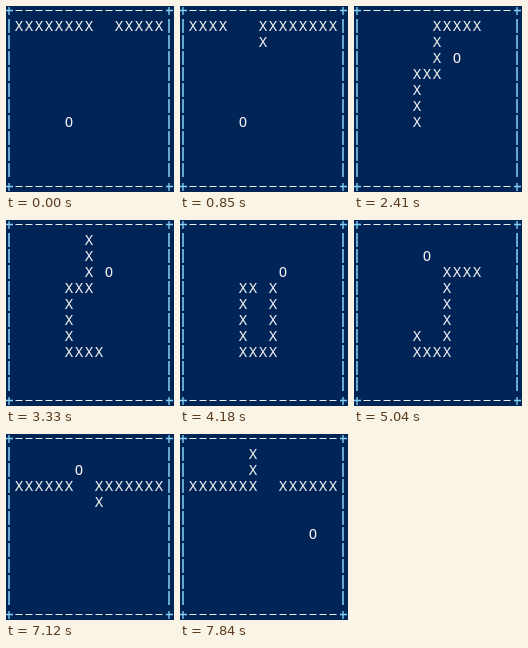
An HTML page that plays this animation: 168 px wide and 186 px high, repeating every 7990 ms.

```html
<!DOCTYPE html>
<html lang="en">
<head>
<meta charset="utf-8">
<title>Console snake</title>
<style>
html, body { margin: 0; width: 100%; height: 100%; overflow: hidden; background: #012456; }
svg { display: block; width: 100%; height: 100%; }
text { font: 14px "DejaVu Sans Mono", monospace; fill: #eeedf0; text-anchor: middle; }
.dash { stroke: #e6ecea; stroke-dasharray: 7 3; }
.pipe { stroke: #86d4f4; stroke-width: 1.5; stroke-dasharray: 14 2; }
.plus { stroke: #86d4f4; stroke-width: 1.3; fill: none; }
</style>
</head>
<body>
<svg viewBox="0 0 168 186">
  <rect width="168" height="186" fill="#012456"/>
  <path class="dash" d="M9.5 4.5H158M9.5 180.5H158"/>
  <path class="pipe" d="M3 13V173M163 13V173"/>
  <path class="plus" d="M0 4.5h7M3 1v8M160 4.5h7M163 1v8M0 180.5h7M3 177v8M160 180.5h7M163 177v8"/>
  <g id="cells"></g>
  <rect id="cursor" height="1" fill="#eeedf0"/>
</svg>
<script>
const LOOP = 7990, COLS = 15, START_LENGTH = 13;
const STEP_TIMES = [
  150, 390, 620, 850, 1080, 1230, 1480, 1720, 1950, 2180,
  2410, 2640, 2790, 3020, 3250, 3480, 3710, 3940, 4180, 4410,
  4650, 4880, 5040, 5280, 5510, 5740, 5970, 6200, 6430, 6660,
  6830, 7040, 7290, 7520, 7760
];
const GROWTH = [24, 35];
const FOODS = [
  { step: 0, col: 6, row: 7 },
  { step: 11, col: 10, row: 3 },
  { step: 21, col: 7, row: 2 },
  { step: 34, col: 13, row: 6 }
];
// Moments when the console cursor shows at a corner
const FLASHES = [
  { at: 1480, col: 0, row: 0 },
  { at: 2790, col: 0, row: 0 },
  { at: 3250, col: 0, row: 0 },
  { at: 7040, col: 0, row: 0 },
  { at: 7520, col: 16, row: 11 },
  { at: 7760, col: 0, row: 0 }
];
const FLASH_LENGTH = 80;
const MOVES = { L: [-1, 0], R: [1, 0], U: [0, -1], D: [0, 1] };

function walk(col, row, route) {
  const path = [{ col, row }];
  for (const [, key, count] of route.matchAll(/([LRUD])(\d+)/g)) {
    for (let i = 0; i < +count; i++) {
      const [dx, dy] = MOVES[key];
      col = (col - 1 + dx + COLS) % COLS + 1;
      row += dy;
      path.push({ col, row });
    }
  }
  return path;
}

const path = walk(8, 1, "L15 D3 L2 D4 R3 U5 R13 U2");
const group = document.getElementById("cells");
const cursor = document.getElementById("cursor");

function makeCell(char) {
  const cell = document.createElementNS("http://www.w3.org/2000/svg", "text");
  cell.textContent = char;
  return group.appendChild(cell);
}

function place(cell, pos) {
  cell.setAttribute("visibility", pos ? "visible" : "hidden");
  if (!pos) return;
  cell.setAttribute("x", 3 + 10 * pos.col);
  cell.setAttribute("y", 9 + 16 * pos.row);
}

const body = Array.from({ length: START_LENGTH + GROWTH.length }, () => makeCell("X"));
const food = makeCell("O");

function render(time) {
  const step = STEP_TIMES.filter(t => t <= time).length;
  const tail = step - GROWTH.filter(g => g <= step).length;
  const snake = path.slice(tail, step + START_LENGTH);
  body.forEach((cell, i) => place(cell, snake[i]));
  place(food, FOODS.filter(f => f.step <= step).pop());

  const flash = FLASHES.find(f => time >= f.at && time < f.at + FLASH_LENGTH);
  cursor.setAttribute("width", flash ? 10 : 0);
  if (flash) {
    cursor.setAttribute("x", 10 * flash.col - 2);
    cursor.setAttribute("y", 16 * flash.row + 8);
  }
}

const start = performance.now();
function tick() {
  render((performance.now() - start) % LOOP);
  requestAnimationFrame(tick);
}
tick();
</script>
</body>
</html>
```
